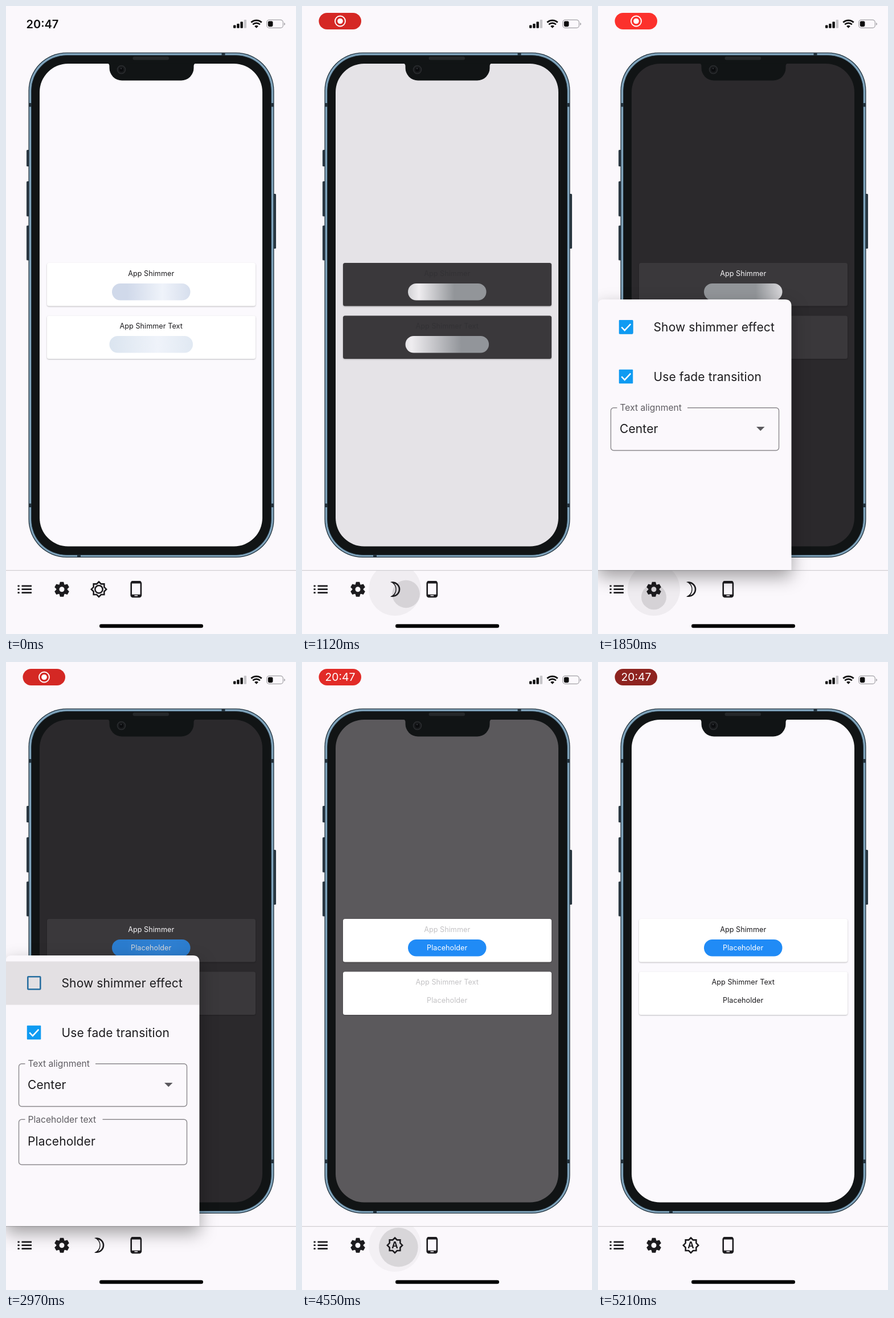
These frames come from a looping animation (509 px wide and 1100 px high, 5240 ms). An HTML page:

```html
<!DOCTYPE html>
<html lang="en">
<head>
<meta charset="utf-8">
<title>Shimmer preview</title>
<style>
  html, body { margin: 0; height: 100%; overflow: hidden; background: #fbf8fc; }
  svg { display: block; width: 509px; height: 1100px; font-family: Inter, sans-serif; }
  .small { font-size: 12.6px; letter-spacing: .06px; text-anchor: middle; }
  .body { font-size: 21px; letter-spacing: .12px; fill: #1c1b1e; }
  .label { font-size: 15.65px; fill: #5f5d62; }
  .field { fill: none; stroke: #8b898d; stroke-width: 1.4; }
  .line { fill: none; stroke: #1c1b1e; }
  .band { fill: #22323d; }
  #card1, #card2 { filter: drop-shadow(0 1.5px 1.2px rgba(0, 0, 0, .26)); }
  #panel { filter: drop-shadow(0 12px 15px rgba(0, 0, 0, .36)); }
</style>
</head>
<body>
<svg viewBox="0 0 509 1100">
  <defs>
    <linearGradient id="sweep1" gradientUnits="userSpaceOnUse"><stop/><stop offset=".5"/><stop offset="1"/></linearGradient>
    <linearGradient id="sweep2" gradientUnits="userSpaceOnUse"><stop/><stop offset=".5"/><stop offset="1"/></linearGradient>
    <clipPath id="barClip"><rect y="989" width="509" height="111"/></clipPath>
    <path id="star" d="M12 2.1 14.9 5H19V9.1L21.9 12 19 14.9V19H14.9L12 21.9 9.1 19H5V14.9L2.1 12 5 9.1V5H9.1Z"/>
    <g id="tick">
      <rect width="24.5" height="24.5" rx="1" fill="#0f9bf2"/>
      <path d="M4.5 12.5l5.5 5.7L20.5 7" fill="none" stroke="#fff" stroke-width="2.5"/>
    </g>
  </defs>

  <!-- status bar -->
  <text id="clock" x="35.5" y="38.5" font-size="20" font-weight="600" fill="#111">20:47</text>
  <g id="pill">
    <rect id="pillBox" x="29.5" y="12" width="74.5" height="29" rx="14.5"/>
    <g id="record"><circle cx="67" cy="26.5" r="9" fill="none" stroke="#fff" stroke-width="1.9"/><circle cx="67" cy="26.5" r="4.8" fill="#fff"/></g>
    <text id="pillTime" x="67" y="33.3" font-size="19.3" text-anchor="middle" fill="#fff">20:47</text>
  </g>
  <g fill="#0c0c0c">
    <rect x="399" y="33.5" width="4.4" height="5.2" rx="1"/>
    <rect x="405.2" y="31" width="4.4" height="7.7" rx="1"/>
    <rect x="411.4" y="27.5" width="4.4" height="11.2" rx="1"/>
    <rect x="417.6" y="24" width="4.4" height="14.7" rx="1" fill="#c6c5c9"/>
    <path d="M439.5 38.8l-3.4-3.5a4.8 4.8 0 0 1 6.8 0z"/>
    <path d="M433.2 32.4a9 9 0 0 1 12.6 0M430.3 28.8a13.2 13.2 0 0 1 18.4 0" fill="none" stroke="#0c0c0c" stroke-width="2.7"/>
    <rect x="457.7" y="24.3" width="28.6" height="14" rx="4.4" fill="none" stroke="#a3a2a6" stroke-width="1.2"/>
    <rect x="459.8" y="26.4" width="8.6" height="9.8" rx="2.4"/>
    <path d="M488 29a2.6 2.6 0 0 1 0 5z" fill="#a3a2a6"/>
  </g>

  <!-- device -->
  <g fill="#2c3943">
    <rect x="36" y="252" width="6" height="29" rx="1.5"/><rect x="36" y="307" width="6" height="61.5" rx="1.5"/>
    <rect x="36" y="384.500" width="6" height="61" rx="1.5"/><rect x="468" y="329" width="6" height="96" rx="1.5"/>
  </g>
  <rect x="39.500" y="81.500" width="431" height="884.500" rx="67" fill="#20313d"/>
  <rect x="40.800" y="82.800" width="428.400" height="881.900" rx="65.700" fill="#80a4bc"/>
  <g class="band">
    <rect x="378.500" y="82" width="6" height="6"/><rect x="125" y="959" width="6" height="6.500"/>
    <rect x="40" y="170" width="6" height="6.500"/><rect x="464" y="170" width="6" height="6.500"/>
    <rect x="40" y="871.500" width="6" height="6.500"/><rect x="464" y="871.500" width="6" height="6.500"/>
  </g>
  <rect x="44.500" y="86.500" width="421" height="875" rx="62" fill="#111415" stroke="#20313d" stroke-width=".8"/>
  <rect id="screen" x="59" y="101" width="391" height="845.500" rx="50"/>
  <path d="M177 100.500q4.500 0 4.500 5v2.500a22 22 0 0 0 22 22.500h104a22 22 0 0 0 22-22.500v-2.500q0-5 4.500-5z" fill="#111415"/>
  <rect x="222.500" y="88.500" width="63.500" height="6" rx="3" fill="#25282a"/>
  <circle cx="202.500" cy="111.500" r="7" fill="#17191b" stroke="#2b2d30" stroke-width="1.5"/>
  <circle cx="202.500" cy="111.500" r="3.500" fill="#0b0c0e"/><circle cx="202" cy="109.500" r="1" fill="#43474d"/>

  <!-- cards -->
  <rect id="card1" x="72" y="450" width="366" height="75.500" rx="3.500"/>
  <rect id="card2" x="72" y="542.500" width="366" height="75.500" rx="3.500"/>
  <g id="titles" class="small"><text x="254.700" y="473">App Shimmer</text><text x="254.700" y="565.300">App Shimmer Text</text></g>
  <g id="shimmer">
    <rect x="186" y="486" width="137.500" height="29.500" rx="14.700" fill="url(#sweep1)"/>
    <rect x="181.500" y="578" width="146.500" height="29.500" rx="14.700" fill="url(#sweep2)"/>
  </g>
  <g id="content" class="small">
    <rect x="186" y="486" width="137.500" height="29.500" rx="14.700" fill="#208bf6"/>
    <text x="254.700" y="504.700" fill="#fff">Placeholder</text>
    <text id="plain" x="254.700" y="597">Placeholder</text>
  </g>

  <!-- toolbar -->
  <rect y="988" width="509" height="1.200" fill="#cfcdd1"/>
  <g clip-path="url(#barClip)"><circle id="glow" r="46"/><circle id="ripple"/></g>
  <path class="line" stroke-width="2.700" d="M20.500 1015.800h3.200M27.500 1015.800h17.500M20.500 1021.700h3.200M27.500 1021.700h17.500M20.500 1027.600h3.200M27.500 1027.600h17.500"/>
  <g id="gear" transform="translate(98 1021.700)"><circle class="line" r="7" stroke-width="5"/></g>
  <g transform="translate(147 1005.700) scale(1.333)">
    <g id="sun" class="line" stroke-width="1.900"><use href="#star"/><circle cx="12" cy="12" r="5"/></g>
    <path id="moon" fill="#1c1b1e" fill-rule="evenodd" d="M6 2.460A10 10 0 1 1 6 21.540A10 10 0 0 0 6 2.460ZM11.200 4.300A8 8 0 0 1 11.200 19.700A12 12 0 0 0 11.200 4.300Z"/>
    <g id="auto"><use href="#star" class="line" stroke-width="1.900"/><text x="12" y="16.200" font-size="11.500" font-weight="700" text-anchor="middle" fill="#1c1b1e">A</text></g>
  </g>
  <rect class="line" x="219.700" y="1008.200" width="17.200" height="26.800" rx="3" stroke-width="2.600"/>
  <path class="line" d="M220 1009.500h16.600M220 1032.800h16.600" stroke-width="4"/>
  <path d="M225.500 1032.800h5.600" stroke="#fbf8fc" stroke-width="1.500"/>
  <rect x="164" y="1082.700" width="182" height="6.600" rx="3.300" fill="#050505"/>

  <!-- settings panel -->
  <g id="panel">
    <path d="M0 988V522q1-8 9-8H328q11.500 0 11.500 11.500V988z" fill="#fbf8fc"/>
    <rect id="row" y="524.500" width="339.500" height="76" fill="#1c1b1e"/>
    <rect id="box" x="38.300" y="551.300" width="22" height="22" rx="1" fill="none" stroke-width="2.600"/>
    <use id="check" href="#tick" x="36.800" y="550"/>
    <use href="#tick" x="36.800" y="636.700"/>
    <g class="body">
      <text x="97.500" y="570">Show shimmer effect</text><text x="97.500" y="656.700">Use fade transition</text>
      <text x="38" y="747.500">Center</text>
    </g>
    <path class="field" d="M33.500 703.700H27.500a5 5 0 0 0-5 5V773.500a5 5 0 0 0 5 5H312.500a5 5 0 0 0 5-5V708.700a5 5 0 0 0-5-5H157"/>
    <text class="label" x="38.500" y="709.300">Text alignment</text>
    <path d="M278 737h14.500l-7.250 7.300z" fill="#5b595e"/>
    <g id="entry">
      <path class="field" d="M33.500 801.200H27.500a5 5 0 0 0-5 5V875.500a5 5 0 0 0 5 5H312.500a5 5 0 0 0 5-5V806.200a5 5 0 0 0-5-5H169.500"/>
      <text class="label" x="38.500" y="806.700">Placeholder text</text>
      <text class="body" x="38" y="846.700">Placeholder</text>
    </g>
  </g>
</svg>
<script>
const LOOP = 5240, DARK_AT = 1100, OPEN_AT = 1835, TOGGLE_AT = 2820, CLOSE_AT = 3620, LIGHT_AT = 4505;
const $ = id => document.getElementById(id);
const ramp = (t, start, length) => Math.min(1, Math.max(0, (t - start) / length));
const mix = (a, b, p) => a + (b - a) * p;
const rgb = (a, b, p) => `rgb(${a.map((v, i) => mix(v, b[i], p))})`;
const set = (id, attrs) => { for (const k in attrs) $(id).setAttribute(k, attrs[k]); };
const show = (id, opacity) => set(id, { opacity: +opacity });

const taps = [
  { at: DARK_AT, icon: 163, x: 190, y: 1033 },
  { at: OPEN_AT, icon: 98, x: 98, y: 1039 },
  { at: CLOSE_AT, icon: 98, x: 98, y: 1036 },
  { at: LIGHT_AT, icon: 163, x: 177, y: 1029 }
];

for (let i = 0; i < 6; i++)
  $('gear').insertAdjacentHTML('beforeend', `<path d="M-4.500-8l1.400-5h6.200l1.400 5z" transform="rotate(${i * 60})" fill="#1c1b1e"/>`);

function drawTap(t) {
  const tap = taps.find(p => t > p.at - 120 && t < p.at + 420);
  show('glow', tap ? .055 * ramp(t, tap.at - 120, 80) * (1 - ramp(t, tap.at, 100)) : 0);
  show('ripple', tap ? .11 * ramp(t, tap.at - 90, 80) * (1 - ramp(t, tap.at + 150, 260)) : 0);
  if (!tap) return;
  const grow = 1 - (1 - ramp(t, tap.at, 140)) ** 2;
  set('glow', { cx: tap.icon, cy: 1022 });
  set('ripple', { cx: mix(tap.x, tap.icon, grow), cy: mix(tap.y, 1022, grow), r: mix(14, 51, grow) });
}

function sweep(id, left, width, half, t, base, light) {
  const center = left + width * (2 * ((t / 1500 + .573) % 1) - .5);
  set(id, { x1: center - half, x2: center + half, y1: 0, y2: 0 });
  [base, light, base].forEach((c, i) => $(id).children[i].setAttribute('stop-color', c));
}

function draw(t) {
  const pillIn = ramp(t, 300, 200), timeIn = ramp(t, 3700, 300);
  const pulse = .5 - .5 * Math.cos(2 * Math.PI * (t - 1030) / 1950);
  const press = ramp(t, 5050, 140);
  show('clock', 1 - pillIn);
  show('pill', pillIn);
  show('record', 1 - timeIn);
  show('pillTime', timeIn);
  set('pillBox', { fill: rgb([mix(212, 255, pulse), mix(40, 50, pulse), mix(36, 45, pulse)], [142, 36, 32], press) });

  const dark = t >= DARK_AT && t < LIGHT_AT;
  const shade = ramp(t, DARK_AT, 200) - ramp(t, LIGHT_AT, 200);
  const ink = rgb([28, 27, 30], [245, 244, 246], shade);
  set('screen', { fill: rgb([251, 249, 253], [43, 41, 44], shade) });
  for (const id of ['card1', 'card2']) set(id, { fill: dark ? '#3a383b' : '#fff' });
  set('titles', { fill: ink });
  set('plain', { fill: ink });
  show('sun', t < DARK_AT);
  show('moon', dark);
  show('auto', t >= LIGHT_AT);

  const swap = ramp(t, TOGGLE_AT, 200);
  show('shimmer', 1 - swap);
  show('content', swap);
  const light = dark ? '#efedf0' : '#eff3fa';
  sweep('sweep1', 186, 137, 62, t, dark ? '#929599' : '#d0d9ea', light);
  sweep('sweep2', 171, 147, 88, t, dark ? '#92959a' : '#dae4ef', light);

  set('panel', { visibility: t >= OPEN_AT && t < CLOSE_AT ? 'visible' : 'hidden' });
  show('row', .11 * ramp(t, 2770, 90) * (1 - ramp(t, 3000, 280)));
  show('check', 1 - ramp(t, TOGGLE_AT, 120));
  set('box', { stroke: rgb([15, 130, 205], [80, 80, 85], ramp(t, TOGGLE_AT + 60, 240)) });
  show('entry', t >= TOGGLE_AT);
  drawTap(t);
}

function frame() {
  draw(performance.now() % LOOP);
  requestAnimationFrame(frame);
}
frame();
</script>
</body>
</html>
```
